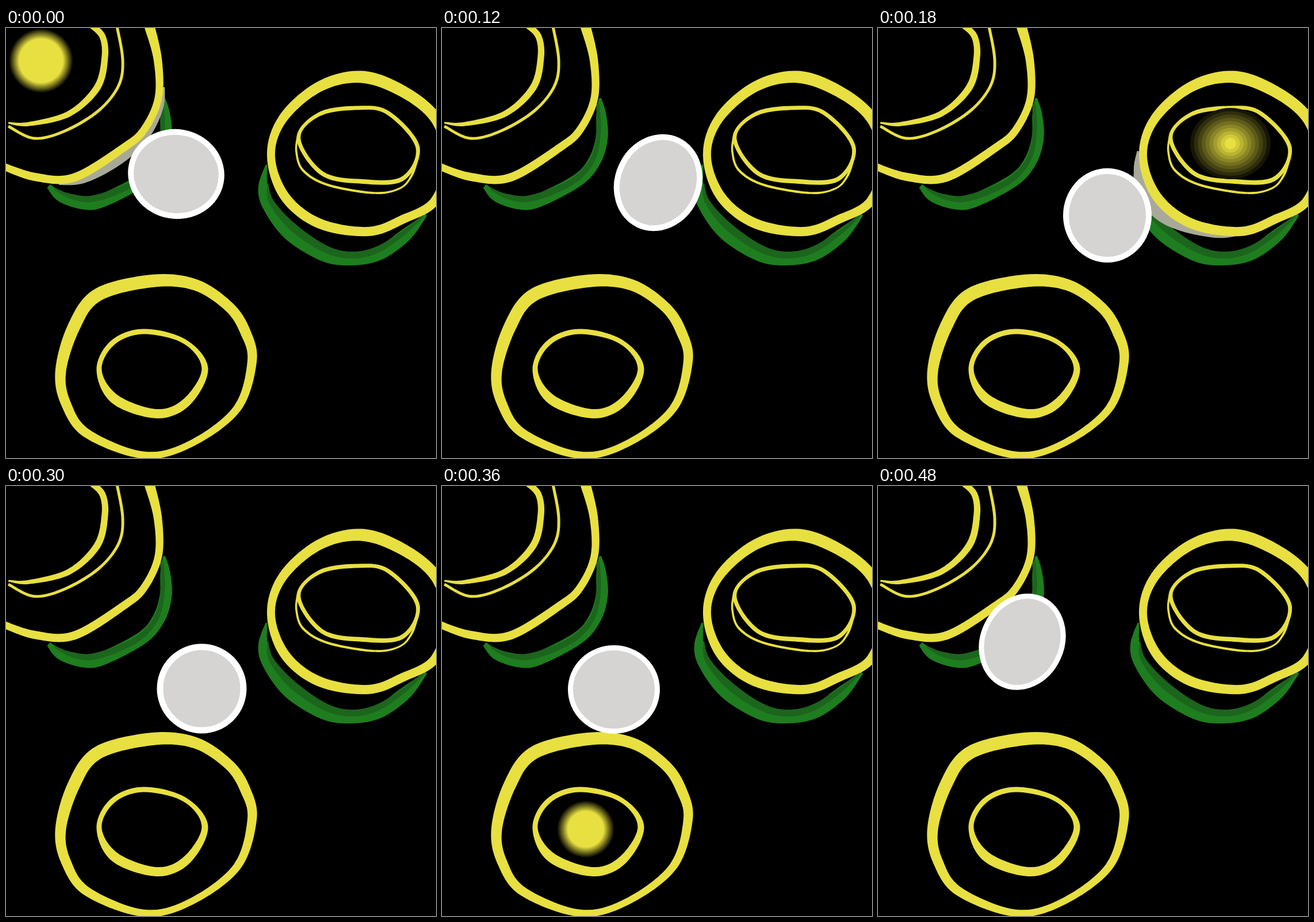
An HTML page that plays this animation: 748x748 px, repeating every 0.54 s.

```html
<!DOCTYPE html>
<html lang="en">
<head>
<meta charset="utf-8">
<title>Pinball bumpers</title>
<style>
html, body { margin: 0; width: 100%; height: 100%; overflow: hidden; background: #000; }
svg { display: block; width: 100vw; height: 100vh; }
</style>
</head>
<body>
<svg id="stage" viewBox="0 0 748 748"></svg>
<script>
const YELLOW = '#e8e040', BRIGHT = '#1e7d1e', DARK = '#1c651c', SHADE = '#a9a99a';
const STEP = 60, STEPS = 9;
const stage = document.getElementById('stage');

function add(tag, attrs, parent = stage) {
  const el = document.createElementNS('http://www.w3.org/2000/svg', tag);
  for (const k in attrs) el.setAttribute(k, attrs[k]);
  parent.appendChild(el);
  return el;
}

const parse = text => text.split(' ').map(s => s.split(',').map(Number));
const mix = (a, b, u) => a + (b - a) * u;

// Neighbour lookup that wraps on closed strokes and clamps on open ones
const picker = (p, closed) => i =>
  p[closed ? (i + p.length) % p.length : Math.max(0, Math.min(p.length - 1, i))];

// Smooth curve through the points
function curve(p, closed) {
  const at = picker(p, closed);
  let d = '' + p[0];
  for (let i = 0; i < p.length - !closed; i++) {
    const [a, b, c, e] = [at(i - 1), at(i), at(i + 1), at(i + 2)];
    const c1 = b.map((v, k) => v + (c[k] - a[k]) / 6);
    const c2 = c.map((v, k) => v - (e[k] - b[k]) / 6);
    d += `C${c1} ${c2} ${c}`;
  }
  return d;
}

// Width at u (0..1), from a few values spread evenly along the stroke
function widthAt(widths, u, closed) {
  const at = picker(widths, closed);
  const s = u * (widths.length - !closed), i = Math.floor(s);
  return mix(at(i), at(i + 1), s - i);
}

// Brush stroke along key points, with changing thickness
function brush(text, widths, color = YELLOW, closed = false) {
  const p = parse(text), at = picker(p, closed);
  const edge = side => p.map(([x, y], i) => {
    const [a, b] = [at(i - 1), at(i + 1)];
    const dx = b[0] - a[0], dy = b[1] - a[1];
    const r = side * widthAt(widths, i / (p.length - !closed), closed) / 2 / Math.hypot(dx, dy);
    return [x - dy * r, y + dx * r];
  });
  const d = closed
    ? `M${curve(edge(1), true)}ZM${curve(edge(-1), true)}Z`
    : `M${curve(edge(1), false)}L${curve(edge(-1).reverse(), false)}Z`;
  return add('path', { d, fill: color, 'fill-rule': 'evenodd' });
}

// Closed or cornered band whose inside hides what lies below
function ring(text, widths, corner) {
  const d = 'M' + curve(parse(text), !corner) + (corner ? `L${corner}Z` : 'Z');
  add('path', { d, fill: '#000' });
  brush(text, widths, YELLOW, !corner);
}

// Top left bumper
brush('275,122 277,150 278,190 266,230 237,264 168,300 135,304 95,293 74,275', [4, 17, 21, 22, 22, 23, 23, 18, 8], BRIGHT);
brush('271,132 273,175 265,222 240,257 200,281 150,297 115,294 85,280', [6, 8, 11, 11, 4], DARK);
const hitLeft = brush('275,103 269,135 250,175 220,211 175,244 130,266 92,271', [3, 15, 16, 14, 4], SHADE);
ring('249,-5 264,55 265,122 240,177 205,208 119,260 50,259 -9,239', [18, 13, 13, 14, 15, 12], [-9, -9]);
brush('150,-4 168,15 172,50 159,103 110,149 40,167 4,165', [11, 11, 12, 9, 3]);
brush('193,-3 203,55 196,100 162,143 105,178 50,192 4,171', [5, 5]);

// Right bumper
brush('453,238 447,275 456,307 494,355 552,393 598,401 648,393 695,360 731,325', [3, 16, 22, 28, 25, 24, 23, 22, 4], BRIGHT);
brush('455,270 462,303 500,347 555,384 600,395 645,386 692,356 725,327', [2, 14, 12, 11, 4], DARK);
const hitRight = brush('452,214 452,245 460,283 487,322 530,345 595,359 642,354', [3, 20, 20, 16, 6], SHADE);
ring('618,85 690,110 748,158 768,230 746,301 690,333 630,354 545,340 485,293 461,222 482,157 545,102', [21, 20, 18, 15, 16, 18, 14, 17]);
brush('508,185 505,215 517,248 560,273 640,287 685,279 706,256 716,224', [3, 4, 4, 3, 5]);
brush('612,139 665,148 716,207 690,262 620,267 550,253 509,192 545,150', [7, 7, 8, 7], YELLOW, true);

// Bottom bumper
ring('255,440 330,447 389,486 417,530 428,580 402,662 322,723 240,743 142,706 105,655 95,598 118,520 160,464', [22, 18, 18, 14, 11, 16, 18, 23]);
brush('238,528 310,545 346,592 315,650 263,671 190,646 162,595 185,548', [9, 8, 11, 15, 16, 17, 9, 9], YELLOW, true);

// Lamp built from stepped discs, dim at the rim
function lamp(cx, cy, core, rx, ry = rx, steps = 10) {
  const g = add('g');
  for (let i = 1; i <= steps; i++) {
    const u = (i - 1) / (steps - 1);
    const rgb = [232, 224, 64].map(v => Math.round(v * i / steps));
    add('ellipse', { cx, cy, rx: mix(rx, core, u), ry: mix(ry, core, u), fill: `rgb(${rgb})` }, g);
  }
  return g;
}

// What lights up at each hit, by step
const hits = {
  0: [lamp(61, 57, 39, 55), hitLeft],
  3: [lamp(613, 201, 10, 70, 62), hitRight],
  6: [lamp(250, 597, 32, 49)]
};

// Ball key poses: step, centre, radii, tilt, rim
const keys = [
  [0, 296, 254, 84, 78, 10, 10],
  [2, 376, 269, 75, 86, 25, 10],
  [3, 399, 326, 77, 82, 0, 10],
  [4, 382, 351, 76, 79, 0, 13],
  [6, 299, 354, 80, 77, 0, 9],
  [8, 251, 271, 73, 86, 25, 9]
];
const ball = add('ellipse', { fill: '#d5d4d2', stroke: '#fff' });

function draw(time) {
  const step = Math.floor(time / STEP) % STEPS;
  for (const k in hits)
    for (const el of hits[k]) el.setAttribute('display', +k === step ? 'inline' : 'none');

  const next = keys.findIndex(k => k[0] >= step);
  const b = keys[next], a = keys[Math.max(0, next - 1)];
  const u = b === a ? 0 : (step - a[0]) / (b[0] - a[0]);
  const [, x, y, rx, ry, tilt, rim] = a.map((v, i) => mix(v, b[i], u));
  ball.setAttribute('rx', rx - rim / 2);
  ball.setAttribute('ry', ry - rim / 2);
  ball.setAttribute('stroke-width', rim);
  ball.setAttribute('transform', `translate(${x} ${y}) rotate(${tilt})`);
}

const start = performance.now();
function tick() {
  draw(performance.now() - start);
  requestAnimationFrame(tick);
}
tick();
</script>
</body>
</html>
```
